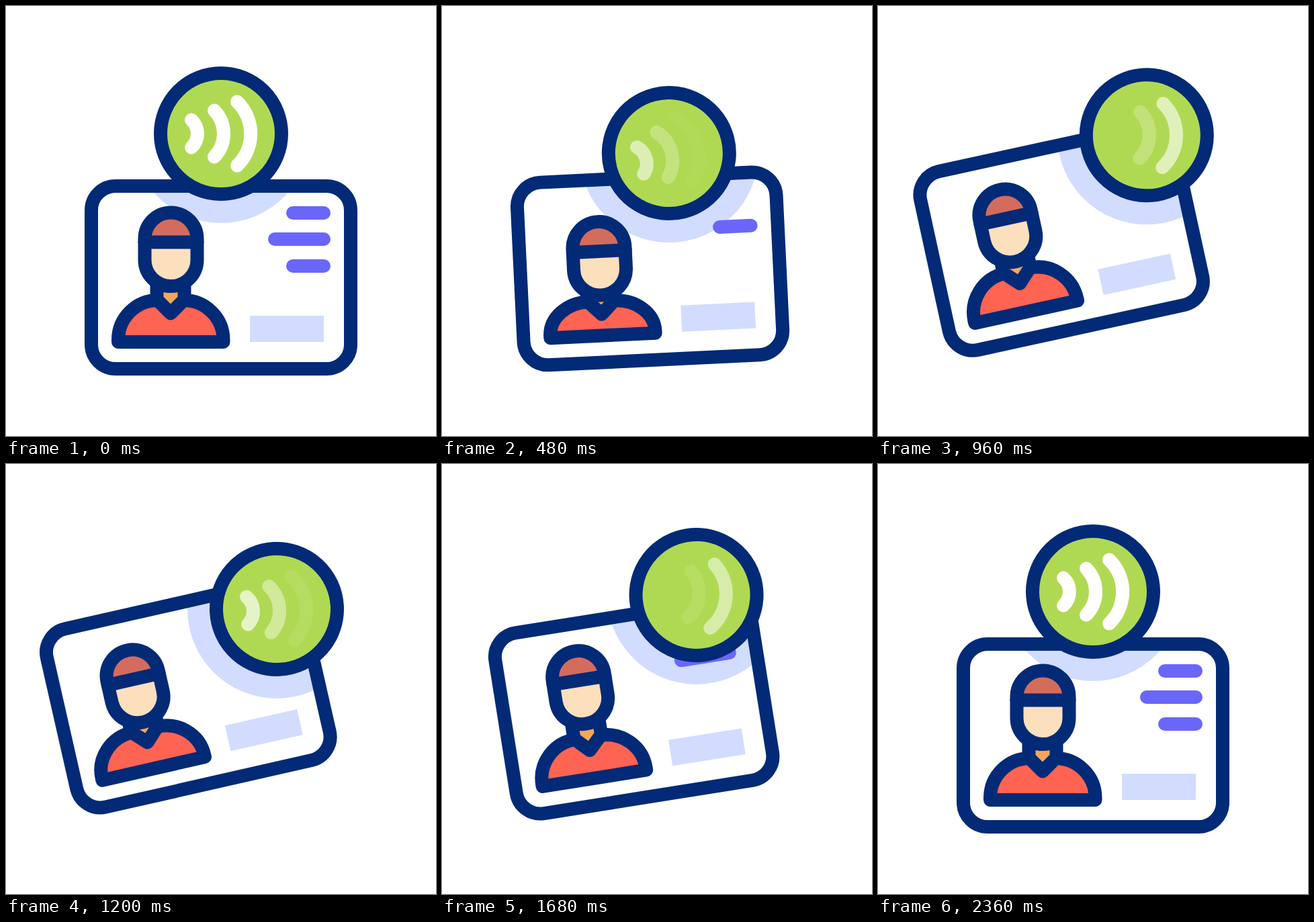
Write an HTML page that moves like this. It is 640x640 px and loops after 2.4 s.

```html
<!DOCTYPE html>
<html lang="en">
<head>
<meta charset="utf-8">
<title>Contactless ID card</title>
<style>
  html, body { margin: 0; width: 100%; height: 100%; overflow: hidden; background: #fff; }
  svg { display: block; width: 100%; height: 100%; }
  .line { fill: none; stroke: #032a76; stroke-width: 20; stroke-linecap: round; stroke-linejoin: round; }
  #bars { stroke: #6a66fa; stroke-width: 20; stroke-linecap: round; }
  #waves { fill: none; stroke: #fff; stroke-width: 20; stroke-linecap: round; }
</style>
</head>
<body>
<svg viewBox="0 0 640 640">
  <defs>
    <clipPath id="inside"><rect id="window" x="127" y="268" width="386" height="272" rx="36"/></clipPath>
  </defs>
  <g clip-path="url(#inside)"><circle id="halo" r="133" fill="#d2dcfe"/></g>
  <g id="card">
    <rect class="line" x="127" y="268" width="386" height="272" rx="36"/>
    <path fill="#d2dcfe" d="M363 461h110v39h-110z"/>
    <path id="body" class="line" style="fill:#ff6352"/>
    <g id="collar">
      <path fill="#f6a65a" d="M225 415h40v23l-20 19-20-19z"/>
      <path class="line" d="M224.5 415v22l20.5 20.5 20.5-20.5v-22"/>
    </g>
    <g id="head">
      <rect x="206.5" y="307.5" width="78" height="109.5" rx="39" fill="#fcdfbd"/>
      <path fill="#d46c5e" d="M206.5 351v-4.5a39 39 0 0 1 78 0v4.5z"/>
      <path class="line" d="M206.5 351.5h78"/>
      <rect class="line" x="206.5" y="307.5" width="78" height="109.5" rx="39"/>
    </g>
    <g id="bars"><path/><path/><path/></g>
  </g>
  <g id="reader">
    <circle class="line" r="90" style="fill:#b0d953"/>
    <g id="waves">
      <path d="M-44-20.5a28 28 0 0 1 0 41"/>
      <path d="M-10-34.5a49.5 49.5 0 0 1 0 69"/>
      <path d="M24-47.5a66 66 0 0 1 0 95"/>
    </g>
  </g>
</svg>
<script>
const LOOP = 2400;
const WAVE_PERIOD = 695;
const BEATS = [0, 430, 750, 1130, 1480, 1850, 2080];
const TRACKS = {
  readerY: [0, 34, -39, 32, -25, 28, 0],
  readerTurn: [0, -16, 8, -4.4, 9, 0, 0],
  headY: [0, 25, -4, 14, -4, 5, 0],
  shoulderY: [0, 12, -6, 3, -3, 3, 0]
};
// Left end, row, start and end of shrinking, start and end of growing
const BARS = [
  [427, 308, 60, 440, 1690, 2020],
  [400, 347, 300, 745, 1250, 1670],
  [427, 387, 80, 460, 1690, 2020]
];
// Start and end of fading out, start and end of fading in
const WAVES = [
  [60, 250, 350, 580],
  [110, 310, 440, 600],
  [180, 400, 475, 830]
];

const $ = id => document.getElementById(id);
const ramp = (t, a, b) => Math.min(1, Math.max(0, (t - a) / (b - a)));
const smooth = (t, a, b) => {
  const x = ramp(t, a, b);
  return x * x * (3 - 2 * x);
};

function track(t, values) {
  return values.reduce((sum, v, i) =>
    i ? sum + (v - values[i - 1]) * smooth(t, BEATS[i - 1], BEATS[i]) : v, 0);
}

// Strong ease-in-out, cubic-bezier(.7, 0, .3, 1)
function strong(x) {
  let lo = 0, hi = 1;
  for (let i = 0; i < 24; i++) {
    const s = (lo + hi) / 2, u = s - 0.5;
    if (0.45 * u + 2.2 * u ** 3 < x - 0.5) lo = s; else hi = s;
  }
  return lo * lo * (3 - 2 * lo);
}

function waveOpacity(t, [out0, out1, in0, in1]) {
  let opacity = 1;
  for (let k = 0; k < 3; k++) {
    const p = t - k * WAVE_PERIOD;
    opacity -= ramp(p, out0, out1) - ramp(p, in0, in1);
  }
  return Math.max(0, opacity);
}

function render(t) {
  const swing = strong(ramp(t, 15, 1205)) - strong(ramp(t, 1228, 2280));
  const cardMove = `translate(${-48.7 * swing} ${-60.8 * swing}) rotate(${-12.8 * swing} 320 404)`;
  $('card').setAttribute('transform', cardMove);
  $('window').setAttribute('transform', cardMove);

  const place = `translate(${320 + 83 * swing} ${190 + track(t, TRACKS.readerY)})`;
  $('halo').setAttribute('transform', place);
  $('reader').setAttribute('transform', `${place} rotate(${track(t, TRACKS.readerTurn)})`);

  const drop = track(t, TRACKS.shoulderY), ry = 59 - drop;
  $('body').setAttribute('d',
    `M167 500v-3a59 ${ry} 0 0 1 59 ${-ry}h38.5a59 ${ry} 0 0 1 59 ${ry}v3z`);
  $('collar').setAttribute('transform', `translate(0 ${drop})`);
  $('head').setAttribute('transform', `translate(0 ${track(t, TRACKS.headY)})`);

  BARS.forEach(([left, y, out0, out1, in0, in1], i) => {
    const size = 1 - smooth(t, out0, out1) + smooth(t, in0, in1);
    const bar = $('bars').children[i];
    bar.setAttribute('d', `M473 ${y}H${473 - (473 - left) * size}`);
    bar.style.display = size > 0 ? '' : 'none';
  });
  WAVES.forEach((times, i) => {
    $('waves').children[i].style.opacity = waveOpacity(t, times);
  });
}

function tick() {
  render(performance.now() % LOOP);
  requestAnimationFrame(tick);
}
tick();
</script>
</body>
</html>
```
